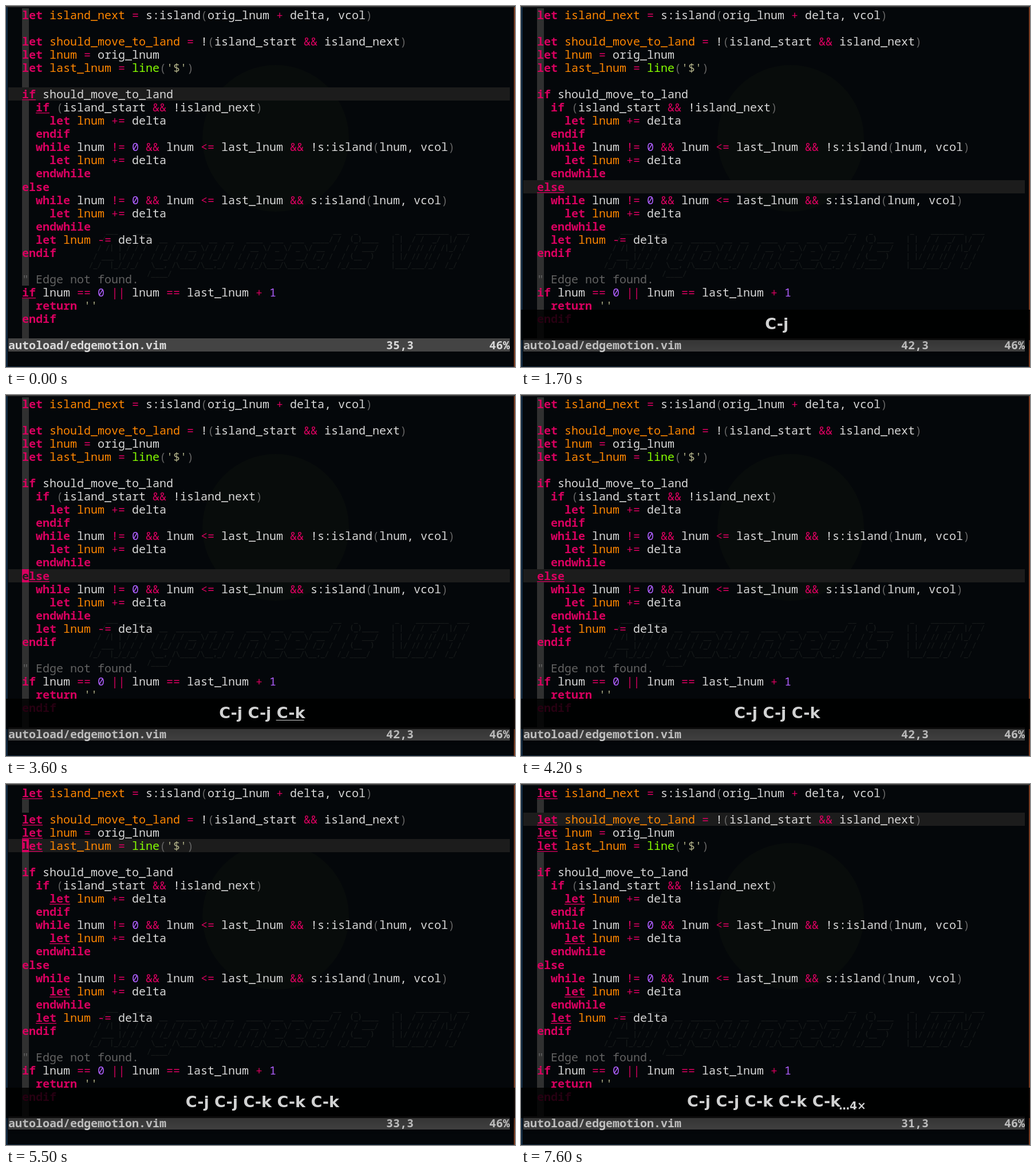
Animation of 889x630 px, one loop 8000 ms. Source, as an HTML page:

```html
<!DOCTYPE html>
<html lang="en">
<head>
<meta charset="utf-8">
<title>Edge motion in an editor</title>
<style>
  html, body { margin: 0; width: 100%; height: 100%; overflow: hidden; background: #04070a; }
  svg { display: block; width: 889px; height: 630px; }
  text { white-space: pre; font: 20px "Noto Sans Mono", "DejaVu Sans Mono", monospace; }
  .b { font-weight: 700; }
  .art { font: 700 12px "DejaVu Sans Mono", monospace; }
  .keys { font: 700 27px "DejaVu Sans", sans-serif; }
  .sub { font-size: 18.7px; }
</style>
</head>
<body>
<svg id="stage" viewBox="0 0 889 630"></svg>
<script>
const LOOP = 8000, CELL = 12, ROW = 23.04, PAD = 4, MID = 446.4;
const PINK = '#d7005f';

const code = String.raw`let island_next = s:island(orig_lnum + delta, vcol)

let should_move_to_land = !(island_start && island_next)
let lnum = orig_lnum
let last_lnum = line('$')

if should_move_to_land
  if (island_start && !island_next)
    let lnum += delta
  endif
  while lnum != 0 && lnum <= last_lnum && !s:island(lnum, vcol)
    let lnum += delta
  endwhile
else
  while lnum != 0 && lnum <= last_lnum && s:island(lnum, vcol)
    let lnum += delta
  endwhile
  let lnum -= delta
endif

" Edge not found.
if lnum == 0 || lnum == last_lnum + 1
  return ''
endif`.split('\n');

const banner = String.raw`    ___    ____                                            __   _         _    ________  ___
   /   |  / / /  __  ______  __  __   ____  ___  ___  ____/ /  (_)____   | |  / /  _/  |/  /
  / /| | / / /  / / / / __ \/ / / /  / __ \/ _ \/ _ \/ __  /  / / ___/   | | / // // /|_/ /
 / ___ |/ / /  / /_/ / /_/ / /_/ /  / / / /  __/  __/ /_/ /  / (__  )    | |/ // // /  / /
/_/  |_/_/_/   \__, /\____/\__,_/  /_/ /_/\___/\___/\__,_/  /_/____/     |___/___/_/  /_/
              /____/`.split('\n');

// Syntax colours in the order of the capture groups below
const colors = ['#626262', '#afaf87', PINK, '#ff8700', '#87ff00', '#af5fff', '#626262', PINK, '#d8d8d8'];
const syntax = /(".*)|('.*?')|\b(let|if|endif|while|endwhile|else|return)\b|((?<=let )\w+)|(\bline\b)|(\b\d\b)|([()])|(&&|\|\||[!<=+-]=|[=+])|([\w:!,]+)/g;

const tokens = code.flatMap((line, row) => [...line.matchAll(syntax)].map(m => {
  const group = m.slice(1).findIndex(g => g !== undefined);
  return { row, col: m.index + 2, s: m[0], fill: colors[group], keyword: group === 2 };
}));

// [time, row the cursor jumps to]
const moves = [[0, 6], [1100, 13], [2300, 18], [3600, 13], [4400, 6], [5300, 4], [5800, 2]];
const cursorOn = [[300, 1700], [2300, 2900], [3500, 4200], [4400, 5000], [5300, 6400], [7000, 7600]];
const pressed = ['C-j', 'C-j', 'C-k', 'C-k', 'C-k'];
const keyWidth = { 'C-j': 40.3, 'C-k': 49 };
const GAP = 9.4, SUB_WIDTH = 47.4;

const esc = s => s.replace(/&/g, '&amp;').replace(/</g, '&lt;');
const rect = (x, y, w, h, fill) => `<rect x="${x}" y="${y}" width="${w}" height="${h}" fill="${fill}"/>`;
const text = (x, y, s, fill, cls = '') => `<text x="${x}" y="${y}" fill="${fill}" class="${cls}">${esc(s)}</text>`;
const colX = c => PAD + c * CELL;
const rowY = r => Math.round(PAD + r * ROW);
const cellText = (c, r, s, fill, bold) => text(colX(c), rowY(r) + 19, s, fill, bold ? 'b' : '');

const backdrop =
  `<defs><linearGradient id="shade" x2="0" y2="1"><stop stop-opacity=".25"/><stop offset="1" stop-opacity="0"/></linearGradient></defs>` +
  rect(0, 0, 889, 630, '#04070a') +
  `<circle cx="471" cy="231" r="128" fill="#080c0b"/>` +
  banner.map((s, i) => text(145, 396 + 15 * i, s, '#171b1b', 'art')).join('') +
  rect(0, 0, 889, 2, '#3a3a3a') + rect(0, 2, 3, 628, '#10283f') +
  rect(0, 629, 889, 1, '#10283f') + rect(887, 2, 2, 628, '#7a3a1e');

function editor(row, on) {
  const word = tokens.find(k => k.row === row && k.col === 2).s;
  const marked = tokens.filter(k => k.keyword && k.s === word);
  let out = '';
  for (let r = 0; r < 25; r++) {
    if (r !== row && !marked.some(k => k.row === r && k.col === 2))
      out += rect(colX(2), rowY(r), CELL, rowY(r + 1) - rowY(r), '#303030');
  }
  out += rect(PAD, rowY(row), 876, 23, '#1c1c1c');
  for (const k of tokens) out += cellText(k.col, k.row, k.s, k.fill, k.keyword);
  for (const k of marked) out += rect(colX(k.col), rowY(k.row) + 21, k.s.length * CELL, 1.3, PINK);
  if (on) out += rect(colX(2), rowY(row), CELL, 23, PINK) + cellText(2, row, word[0], '#1c1c1c', true);

  out += rect(PAD, rowY(25), 876, 23, '#444');
  [[0, 'autoload/edgemotion.vim'], [55, `${row + 29},3`], [70, '46%']]
    .forEach(([c, s]) => out += cellText(c, 25, s, '#dadada', true));
  return out;
}

function keyPanel(t) {
  const times = moves.slice(1).map(m => m[0]).filter(m => m <= t);
  if (!times.length) return '';
  const repeated = times.length > pressed.length;
  const shown = pressed.slice(0, times.length);
  const span = shown.reduce((w, k) => w + keyWidth[k] + GAP, -GAP);
  const left = MID - (span + (repeated ? SUB_WIDTH : 0)) / 2, end = left + span;
  const base = repeated ? 563 : 564;
  const opacity = t < 1200 ? 0.46 : t < 1300 ? 0.68 : 0.82;

  let out = rect(0, 530, 889, 53, '#000') + rect(0, 583, 889, 29, 'url(#shade)') +
    text(left, base, shown.join(' '), '#fff', 'keys');
  if (repeated) out += text(end, 568, '…4×', '#fff', 'keys sub');
  if (t - times.at(-1) < 200) {
    const w = repeated ? SUB_WIDTH : keyWidth[shown.at(-1)];
    out += rect(repeated ? end : end - w, repeated ? 570 : 567, w, 1, '#fff');
  }
  return `<g opacity="${opacity}">${out}</g>`;
}

const stageEl = document.getElementById('stage');
let last = '';
function frame() {
  const t = performance.now() % LOOP;
  const row = moves.filter(m => m[0] <= t).at(-1)[1];
  const on = cursorOn.some(([a, b]) => t >= a && t < b);
  const picture = backdrop + editor(row, on) + keyPanel(t);
  if (picture !== last) stageEl.innerHTML = last = picture;
  requestAnimationFrame(frame);
}
frame();
</script>
</body>
</html>
```
